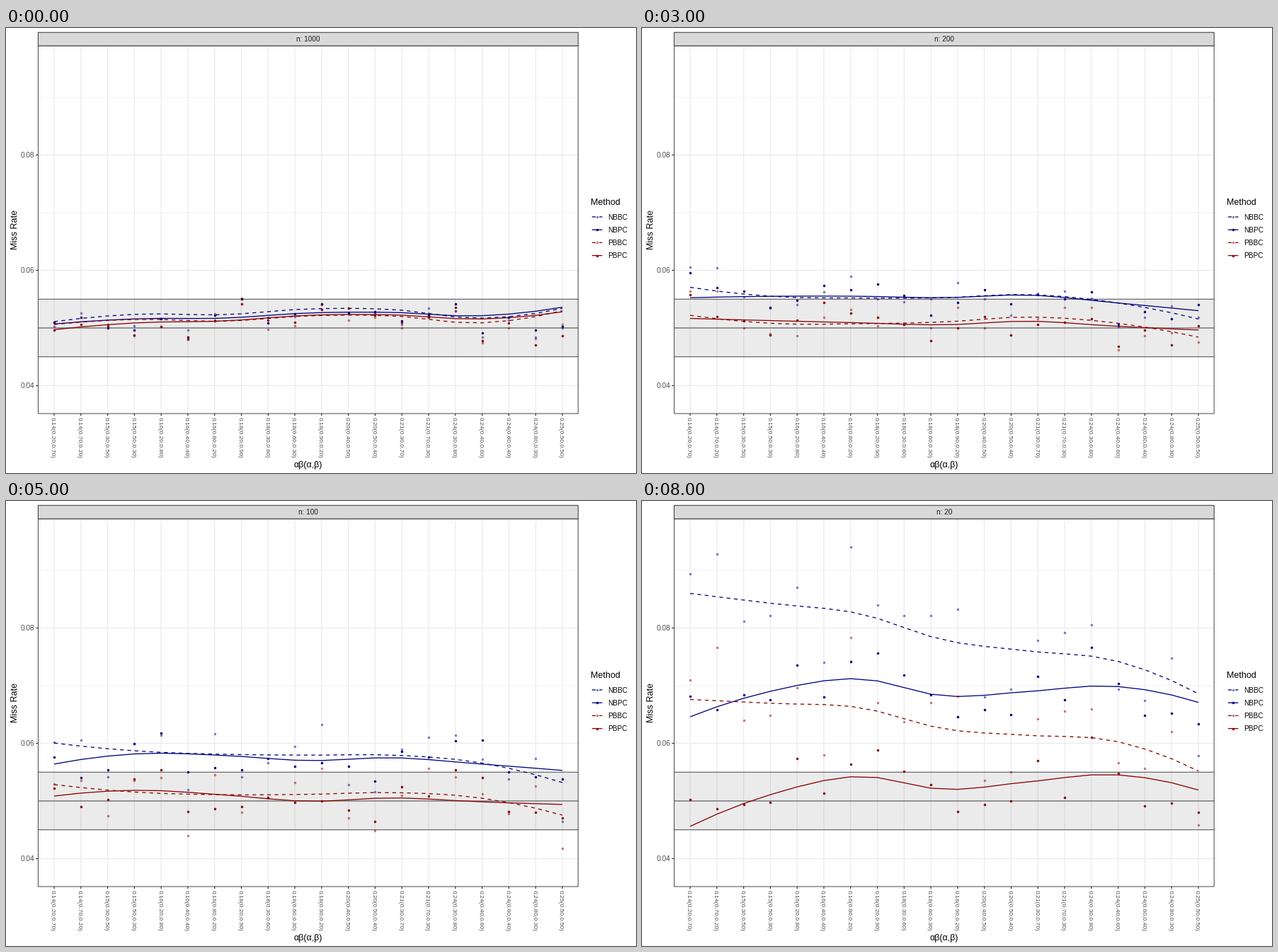
These frames come from a looping animation (890 by 629 pixels, 9 s). A matplotlib script:

```python
import numpy as np
import matplotlib.pyplot as plt
from matplotlib.animation import FuncAnimation
from matplotlib.patches import Rectangle

W, H, DPI = 890, 629, 100
PX = 72 / DPI  # points per pixel
LEFT, RIGHT, TOP, BOTTOM = 45.4, 808.2, 25.2, 545
DARK, GRID, LABEL = "#333333", "#EBEBEB", "#4D4D4D"
BLUE, RED = "#000080", "#8B0000"
METHODS = {  # colour, line style, point opacity
    "NBBC": (BLUE, (0, (4, 4)), 0.5),
    "NBPC": (BLUE, "-", 1),
    "PBBC": (RED, (0, (4, 4)), 0.5),
    "PBPC": (RED, "-", 1),
}
PAIRS = [(2, 7), (7, 2), (3, 5), (5, 3), (2, 8), (4, 4), (8, 2), (2, 9), (3, 6), (6, 3),
         (9, 2), (4, 5), (5, 4), (3, 7), (7, 3), (3, 8), (4, 6), (6, 4), (8, 3), (5, 5)]
COUNT = len(PAIRS)
COLS = np.linspace(68, 786, COUNT)
SKEW = np.array([a - b for a, b in PAIRS])

# Systematic scatter: balanced pairs fall below the trend, uneven ones above it
DIP = -20 - 70 * np.cos(np.pi * np.minimum(abs(SKEW), 4.5) / 4.5)
BIAS = {"BC": DIP + 6 * SKEW, "PC": 0.3 * DIP - 3 * SKEW}

rng = np.random.default_rng(7)


def rate_y(rate):
    return 505.5 - (rate - 0.04) * 8150


def smooth(keys):
    """Cubic Hermite curve through evenly spaced key values, one per column."""
    keys = np.array(keys, float)
    t = np.linspace(0, len(keys) - 1, COUNT)
    i = np.minimum(t.astype(int), len(keys) - 2)
    u = t - i
    m = np.gradient(keys, edge_order=2)
    return ((1 + 2 * u) * (1 - u) ** 2 * keys[i] + u * (1 - u) ** 2 * m[i]
            + u * u * (3 - 2 * u) * keys[i + 1] + u * u * (u - 1) * m[i + 1])


def trends(bc, bc_gap, pc, pc_gap):
    """NB curves from key rates (1e-4); PB curves lie a slowly varying gap below."""
    bc, pc = smooth(bc), smooth(pc)
    return np.array([bc, pc, bc - smooth(bc_gap), pc - smooth(pc_gap)])


def scatter(n, curves):
    """Points around the curves: bias grows as n shrinks, sampling noise is mostly shared."""
    shared = np.clip(rng.normal(0, 22, COUNT), -45, 45)
    rows = [curve + min(1, 60 / n) * BIAS[name[2:]] + shared + rng.normal(0, 6, COUNT)
            for name, curve in zip(METHODS, curves)]
    return 2 * np.round(np.array(rows) / 2)


t1000 = trends([511, 524, 523, 533, 532, 517, 534], [5, 12, 4],
               [507, 516, 517, 526, 527, 521, 536], [10, 4, 8])
t250 = trends([555, 532, 539, 540, 541, 534, 526], [36, 27, 21],
              [547, 544, 551, 545, 544, 538, 533], [36, 39, 23])
t150 = trends([586, 577, 565, 565, 575, 555, 505], [61, 57, 42],
              [558, 566, 559, 560, 570, 550, 527], [36, 55, 44])
t75 = trends([615, 596, 597, 594, 584, 579, 559], [83, 79, 71],
             [570, 598, 599, 580, 580, 579, 579], [75, 86, 74])
t50 = trends([737, 650, 613, 601, 629, 636, 580], [116, 92, 106],
             [663, 639, 617, 610, 629, 635, 612], [98, 117, 101])
t20 = trends([860, 842, 825, 779, 760, 744, 686], [184, 154, 134],
             [646, 692, 712, 682, 690, 699, 671], [190, 162, 152])

STUDIES = [(n, curves, scatter(n, curves)) for n, curves in [
    (1000, t1000), (500, (t1000 + t250) / 2), (250, t250),
    (200, (t250 + t150) / 2), (150, t150), (100, (t150 + t75) / 2),
    (75, t75), (50, t50), (20, t20)]]

plt.rcParams.update({"font.family": "Liberation Sans", "path.snap": False})
fig = plt.figure(figsize=(W / DPI, H / DPI), dpi=DPI, facecolor="white")
ax = fig.add_axes([0, 0, 1, 1])
ax.set_xlim(0, W)
ax.set_ylim(H, 0)
ax.axis("off")


def line(x, y, color, width, **kw):
    return ax.plot(x, y, color=color, lw=width * PX, solid_capstyle="butt", **kw)[0]


def dots(x, y, color, alpha):
    return ax.plot(x, y, "o", color=color, alpha=alpha, ms=3.5 * PX, mew=0, zorder=4)[0]


def box(x0, y0, x1, y1, z, **kw):
    ax.add_patch(Rectangle((x0, y0), x1 - x0, y1 - y0, zorder=z, **kw))


def text(x, y, s, size, color="black", **kw):
    return ax.text(x, y, s, fontsize=size * PX, color=color, va="baseline",
                   rotation_mode="anchor", **kw)


# Grid, ticks and tick labels
for rate in (0.05, 0.07, 0.09):
    line([LEFT, RIGHT], [rate_y(rate)] * 2, GRID, 0.6, zorder=1)
for rate in (0.04, 0.06, 0.08):
    y = rate_y(rate)
    line([LEFT, RIGHT], [y, y], GRID, 1.2, zorder=1)
    line([LEFT - 3.2, LEFT], [y, y], DARK, 1.2, zorder=1)
    text(40.5, y + 3.6, f"{rate:.2f}", 10, LABEL, ha="right")
for x, (a, b) in zip(COLS, PAIRS):
    line([x, x], [TOP, BOTTOM], GRID, 1.2, zorder=1)
    line([x, x], [BOTTOM, BOTTOM + 3.2], DARK, 1.2, zorder=1)
    text(x - 4, 550.5, f"{a * b / 100:.2f}({a / 10:.2f},{b / 10:.2f})", 8.5, LABEL,
         rotation=270, ha="left")

# Tolerance band
box(LEFT, rate_y(0.055), RIGHT, rate_y(0.045), 2, fc="black", alpha=0.08, lw=0)
for rate in (0.045, 0.05, 0.055):
    line([LEFT, RIGHT], [rate_y(rate)] * 2, DARK, 0.9, zorder=2.5)

# Frame, strip and titles
box(LEFT, TOP, RIGHT, BOTTOM, 6, fc="none", ec=DARK, lw=0.9 * PX)
box(LEFT, 6.2, RIGHT, TOP, 6, fc="#D9D9D9", ec=DARK, lw=PX)
strip = text(427, 19.2, "", 10, "#1A1A1A", ha="center", zorder=7)
text(427, 620.5, "αβ(α,β)", 12.5, ha="center")
text(16.3, 285, "Miss Rate", 12.5, rotation=90, ha="center")

# Legend
text(826, 250, "Method", 12.5)
for k, (name, (color, style, alpha)) in enumerate(METHODS.items()):
    y = 267 + 18.2 * k
    line([827.8, 842.4], [y, y], color, 1.3, ls=style)
    dots([835.1], [y], color, alpha)
    text(850.3, y + 3.7, name, 10)

lines = [line([], [], c, 1.3, ls=s, zorder=3) for c, s, _ in METHODS.values()]
clouds = [dots([], [], c, a) for c, _, a in METHODS.values()]


def update(i):
    n, curves, points = STUDIES[i]
    strip.set_text(f"n: {n}")
    for artist, rates in zip(lines + clouds, [*curves, *points]):
        artist.set_data(COLS, rate_y(rates / 1e4))
    return [strip, *lines, *clouds]


anim = FuncAnimation(fig, update, frames=len(STUDIES), interval=1000,
                     repeat=True, repeat_delay=0, blit=False)
plt.show()
```
